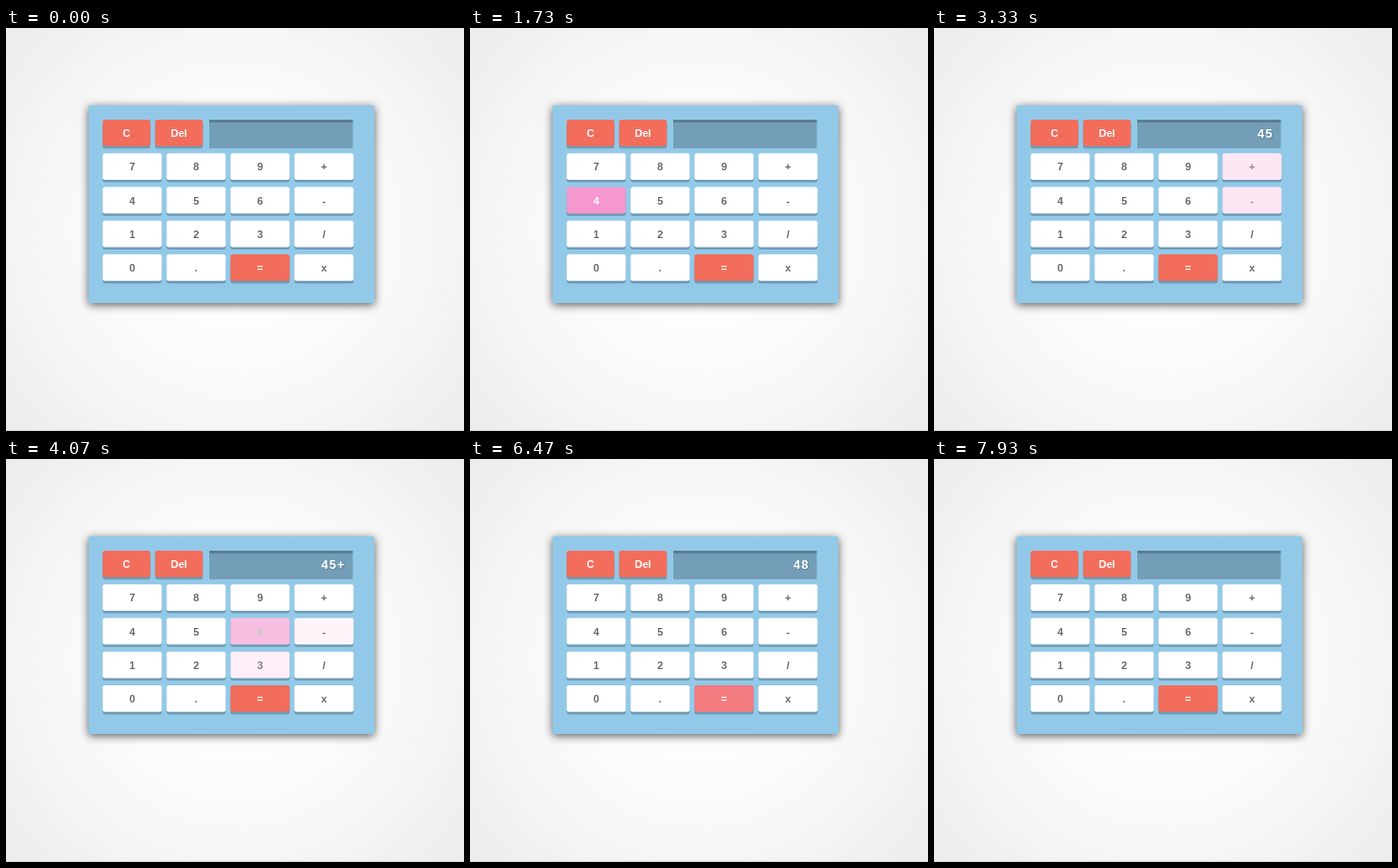
Recreate the animation shown at these times as an HTML page. Size 480 px wide and 422 px high, loop 8000 ms.

```html
<!DOCTYPE html>
<html lang="en">
<head>
<meta charset="utf-8">
<title>Calculator</title>
<style>
  html, body { margin: 0; width: 100%; height: 100%; overflow: hidden; }
  svg { display: block; width: 100%; height: 100%; }
  text { font: bold 11px "Liberation Sans", Arial, sans-serif; text-anchor: middle; }
  #display { font-size: 13px; letter-spacing: 1px; text-anchor: end; fill: #fff; text-shadow: 1px 1px 2px rgba(0, 0, 0, .2); }
  #panel { filter: drop-shadow(0 2px 5px rgba(0, 0, 0, .65)); }
</style>
</head>
<body>
<svg viewBox="0 0 480 422">
  <defs>
    <radialGradient id="bg" gradientUnits="userSpaceOnUse" cx="240" cy="211" r="320">
      <stop offset="0" stop-color="#fff"/>
      <stop offset=".45" stop-color="#fcfbfc"/>
      <stop offset="1" stop-color="#ececec"/>
    </radialGradient>
  </defs>
  <rect width="480" height="422" fill="url(#bg)"/>
  <rect y="421" width="480" height="1" fill="#d9d9d9"/>
  <rect id="panel" x="86.5" y="81" width="299.5" height="207" rx="1.5" fill="#93c9e8"/>
  <rect x="213" y="96" width="150.5" height="30" rx="1" fill="#749eb8"/>
  <rect x="213" y="96" width="150.5" height="3" rx="1" fill="#5b7e94"/>
  <text id="display" x="355.5" y="115"></text>
  <g id="keys"></g>
</svg>
<script>
const LOOP = 8000, FADE = 200;
const WHITE = [255, 255, 255], RED = [242, 109, 91], PINK = [246, 152, 208], GREY = [104, 104, 104];

// Pointer path: key, enter, leave, press time (if any), display after the press
const path = [
  ["3", 790, 870], ["6", 870, 1180], ["5", 1180, 1330],
  ["4", 1330, 2240, 1930, "4"], ["5", 2240, 2340], ["6", 2340, 2500],
  ["5", 2500, 3040, 2800, "45"], ["6", 3040, 3115], ["-", 3262, 3301],
  ["+", 3301, 3880, 3660, "45+"], ["-", 3880, 3960], ["6", 3960, 4050],
  ["3", 4050, 4580, 4400, "45+3"],
  ["=", 5280, 6388, 5670, "48"],
  ["2", 6500, 6580], ["5", 6580, 6660], ["8", 6660, 6750], ["Del", 6830, 6930],
  ["C", 6930, 7480, 7200, ""], ["7", 7480, 7560], ["4", 7560, 7640]
];
const PRESS = 120;

const root = document.getElementById("keys");
const display = document.getElementById("display");
const keys = [];

function add(parent, tag, attrs) {
  const el = document.createElementNS("http://www.w3.org/2000/svg", tag);
  for (const name in attrs) el.setAttribute(name, attrs[name]);
  return parent.appendChild(el);
}

function addKey(label, x, y, width, red) {
  const shadow = add(root, "rect", { x, y: y + 3, width, height: 27.3, rx: 2.5, fill: "#6f9bb4" });
  const cap = add(root, "g", {});
  const face = add(cap, "rect", { x, y, width, height: 27.7, rx: 2.5 });
  const text = add(cap, "text", { x: x + width / 2, y: y + 18 });
  text.textContent = label;
  keys.push({
    label, shadow, cap, face, text,
    base: red ? RED : WHITE,
    ink: red ? WHITE : GREY,
    visits: path.filter(step => step[0] === label)
  });
}

addKey("C", 101.3, 96, 50, true);
addKey("Del", 156.3, 96, 50, true);
["789+", "456-", "123/", "0.=x"].forEach((row, r) =>
  [...row].forEach((label, c) => addKey(label, 101.3 + c * 67, 131.2 + r * 35.3, 62, label === "=")));

function ease(x) {
  x = Math.min(1, Math.max(0, x));
  return 1 - (1 - x ** 1.3) ** 3;
}

function glow(t, enter, leave) {
  return ease((Math.min(t, leave) - enter) / FADE) * (1 - ease((t - leave) / FADE));
}

function mix(a, b, k) {
  return `rgb(${a.map((v, i) => Math.round(v + (b[i] - v) * k))})`;
}

function draw(t) {
  for (const key of keys) {
    let hover = 0, down = 0;
    for (const [, enter, leave, press] of key.visits) {
      hover = Math.max(hover, glow(t, enter, leave));
      if (press) down = Math.max(down, glow(t, press - 60, press + PRESS));
    }
    key.face.setAttribute("fill", mix(key.base, PINK, hover));
    key.text.setAttribute("fill", mix(key.ink, WHITE, hover));
    key.cap.setAttribute("transform", `translate(0 ${4 * down})`);
    key.shadow.setAttribute("opacity", 1 - down);
  }
  let shown = "";
  for (const [, , , press, value] of path) if (press && t >= press + PRESS) shown = value;
  if (display.textContent !== shown) display.textContent = shown;
}

const start = performance.now();
function tick() {
  draw((performance.now() - start) % LOOP);
  requestAnimationFrame(tick);
}
tick();
</script>
</body>
</html>
```
